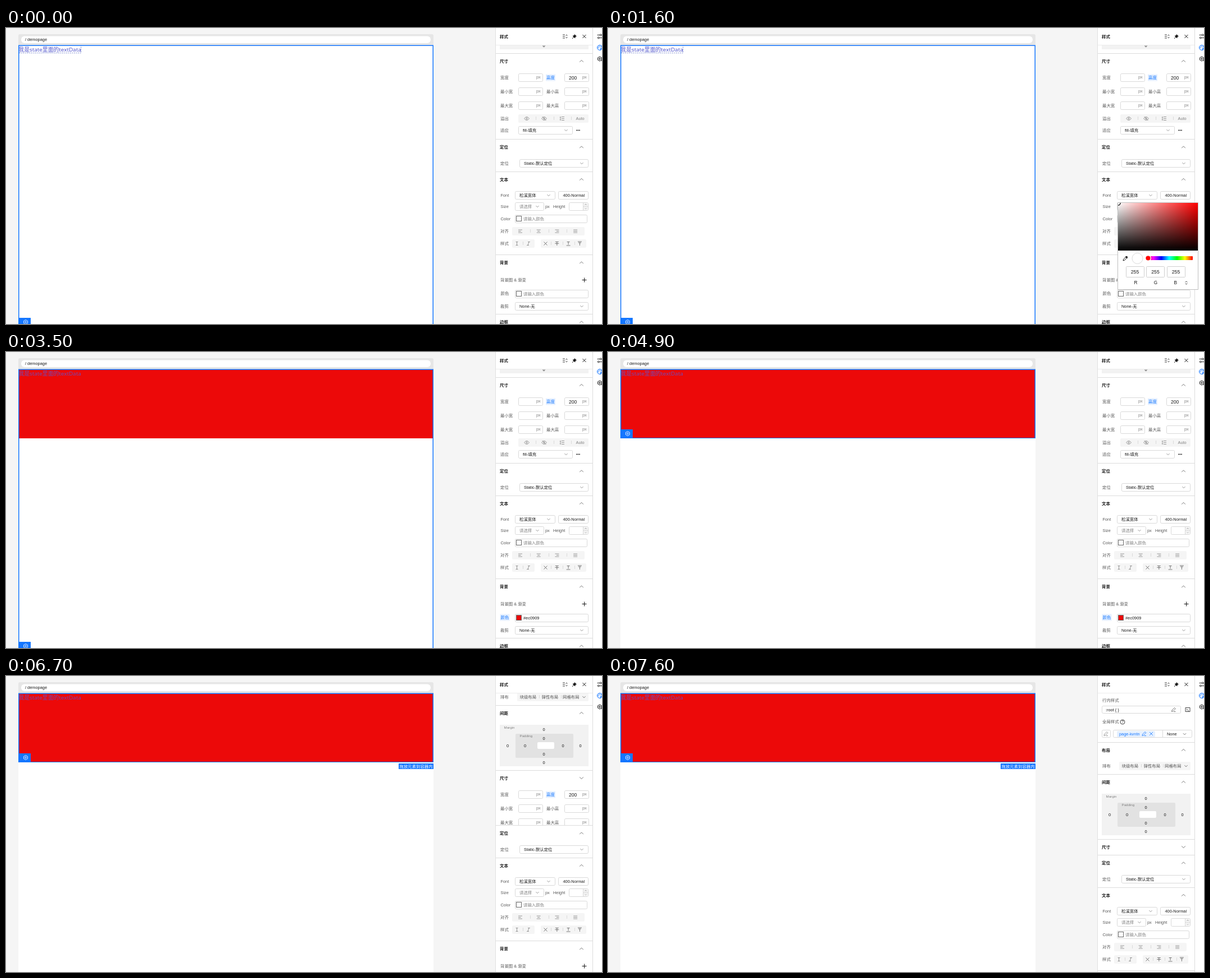
Write an HTML page with a canvas that moves like this. It is 1061x528 px and loops after 8 s.

```html
<!DOCTYPE html>
<html lang="zh-CN">
<head>
<meta charset="utf-8">
<title>样式</title>
<style>
html, body { margin: 0; width: 100%; height: 100%; overflow: hidden; background: #f5f5f5; }
canvas { display: block; width: 100vw; height: 100vh; }
</style>
</head>
<body>
<canvas id="stage" width="1061" height="528"></canvas>
<script>
const ctx = document.getElementById('stage').getContext('2d');
const LOOP = 8000;
const UI = '"Liberation Sans", "Noto Sans CJK SC", "Noto Sans CJK", sans-serif';
const PAGE = '"Noto Sans", "Noto Sans CJK SC", "Noto Sans CJK", sans-serif';
const BLUE = '#1476ff', RED = '#ec0909', INK = '#191919', GREY = '#595959', SOFT = '#808080';
const EDGE = '#d9d9d9', FILL = '#f5f5f5', TINT = '#e5f0ff';

// Drawing helpers
function rect(x, y, w, h, color) {
  ctx.fillStyle = color;
  ctx.fillRect(x, y, w, h);
}
function round(x, y, w, h, r, color) {
  ctx.fillStyle = color;
  ctx.beginPath();
  ctx.roundRect(x, y, w, h, r);
  ctx.fill();
}
function box(x, y, w, h, edge = EDGE, r = 2) {
  ctx.beginPath();
  ctx.roundRect(x + .5, y + .5, w - 1, h - 1, r);
  ctx.fillStyle = '#fff';
  ctx.fill();
  ctx.strokeStyle = edge;
  ctx.lineWidth = 1;
  ctx.stroke();
}
function text(s, x, y, color = GREY, size = 7.4, opt = {}) {
  ctx.font = `${opt.weight || 400} ${size}px ${opt.font || UI}`;
  ctx.textAlign = opt.align || 'left';
  ctx.fillStyle = color;
  ctx.fillText(s, x, y + size * .36);
}
function icon(x, y, d, color = GREY, width = .8) {
  ctx.save();
  ctx.translate(x, y);
  ctx.strokeStyle = color;
  ctx.lineWidth = width;
  ctx.stroke(new Path2D(d));
  ctx.restore();
}
function disc(x, y, r, fill, edge, width = 1) {
  ctx.beginPath();
  ctx.arc(x, y, r, 0, Math.PI * 2);
  if (fill) { ctx.fillStyle = fill; ctx.fill(); }
  if (edge) { ctx.strokeStyle = edge; ctx.lineWidth = width; ctx.stroke(); }
}
function clipped(x, y, w, h, draw) {
  ctx.save();
  ctx.beginPath();
  ctx.rect(x, y, w, h);
  ctx.clip();
  draw();
  ctx.restore();
}
function shifted(dy, draw) {
  ctx.save();
  ctx.translate(0, dy);
  draw();
  ctx.restore();
}

const SHAPE = {
  up: 'M-3.3 1.7L0 -1.7L3.3 1.7',
  down: 'M-2.6 -1.3L0 1.4L2.6 -1.3',
  cross: 'M-3 -3L3 3M3 -3L-3 3',
  plus: 'M-4 0H4M0 -4V4',
  pencil: 'M-3.5 3.5L-3 1L1.5 -3.5L3.3 -1.7L-1 2.7ZM0 3.5H3.5',
  eye: 'M-4.5 0Q0 -6 4.5 0Q0 6 -4.5 0ZM-1.3 0A1.3 1.3 0 1 0 1.3 0A1.3 1.3 0 1 0 -1.3 0',
  list: 'M-1 -3H4M-1 0H4M-1 3H4M-3 -3V3M-4 -2L-3 -3L-2 -2M-4 2L-3 3L-2 2',
  gear: 'M0 -4L3.5 -2V2L0 4L-3.5 2V-2ZM-1.4 0A1.4 1.4 0 1 0 1.4 0A1.4 1.4 0 1 0 -1.4 0',
  left: 'M-3.5 -2.5H3.5M-3.5 0H1M-3.5 2.5H3.5',
  center: 'M-3.5 -2.5H3.5M-2 0H2M-3.5 2.5H3.5',
  right: 'M-3.5 -2.5H3.5M-1 0H3.5M-3.5 2.5H3.5',
  justify: 'M-3.5 -2.5H3.5M-3.5 0H3.5M-3.5 2.5H3.5',
  upright: 'M-2 -3H2M-2 3H2M0 -3V3',
  italic: 'M-1 -3H3M-3 3H1M1 -3L-1 3',
  strike: 'M-3 -3H3M-3.5 0H3.5M0 -3V3.5',
  under: 'M-2.5 -3H2.5M0 -3V2M-3.5 3.5H3.5',
  over: 'M-3.5 -3.5H3.5M-2.5 -1.5H2.5M0 -1.5V3.5'
};

// Panel building blocks
function section(name, line, y, open = true) {
  rect(872, line, 172, 1, '#dcdcdc');
  text(name, 879, y, INK, 7.4, { weight: 700 });
  icon(1024.5, y, open ? SHAPE.up : 'M-3.3 -1.7L0 1.7L3.3 -1.7', GREY);
}
function select(x, y, w, value, color = INK, arrow = SOFT, pad = 8) {
  box(x, y - 7, w, 15);
  text(value, x + pad, y, color);
  icon(x + w - 12, y + .3, SHAPE.down, arrow);
}
function pxField(x, y, value, color = SOFT) {
  box(x, y - 7, 44, 15);
  if (value) text(value, x + 8, y + .5, INK, 8.6);
  text('px', x + 32, y - .5, color);
}
function group(x, y, w, seps) {
  round(x, y - 7, w, 15, 2, FILL);
  for (const s of seps) rect(s, y - 3, 1, 6, '#dadada');
}
function active(name, x, y) {
  rect(x - 1, y - 6, 17, 12, TINT);
  text(name, x, y, BLUE);
}
function colorField(y, w, swatch, value) {
  box(906, y - 7, w, 15);
  rect(908, y - 5, 10, 10, '#666');
  rect(909, y - 4, 8, 8, swatch);
  text(value || '请输入颜色', 921, y, value ? INK : SOFT);
}

function upperSections() {
  text('行内样式', 880, 43);
  box(879, 53, 141, 14);
  text(':root { }', 886, 60, INK);
  icon(1007, 60, SHAPE.pencil);
  icon(1032, 60, 'M-4 -3.5H4V3.5H-4ZM-2 -1.5L-.5 0L-2 1.5M0 2H2', INK);
  text('全局样式', 880, 81.5);
  disc(916, 82, 4, null, INK, .8);
  text('?', 916, 82, INK, 6.5, { align: 'center' });

  box(879, 96, 16, 14);
  icon(886.5, 103, SHAPE.pencil, SOFT);
  box(899, 96, 141, 14);
  rect(987, 96, 1, 14, EDGE);
  round(906, 98, 68, 11, 2, TINT);
  text('page-kvntn', 910, 103, BLUE);
  icon(954.5, 103, SHAPE.pencil, BLUE);
  icon(967, 103, SHAPE.cross, BLUE);
  text('None', 995, 103, INK);
  icon(1026.5, 103.5, SHAPE.down);

  section('布局', 118, 132);
  text('排布', 880, 160);
  group(910, 160, 127, [949, 988]);
  ['块级布局', '弹性布局', '网格布局'].forEach((s, i) => text(s, [914.5, 953.5, 991][i], 160, GREY));
  icon(1029, 160.5, SHAPE.down);

  section('间距', 175, 189);
  rect(879, 210, 158, 74, '#f2f2f2');
  round(907, 226, 103, 43, 2, '#e2e2e2');
  round(946, 241, 30, 12, 2, '#fff');
  text('Margin', 886.5, 215, SOFT, 6.2);
  text('Padding', 914.5, 230, SOFT, 6.2);
  for (const y of [218.5, 234, 262, 277]) text('0', 957.5, y, INK, 7.4, { align: 'center' });
  for (const x of [893, 924, 991.5, 1022.5]) text('0', x, 247.5, INK, 7.4, { align: 'center' });
}

function sizeSection(open, extra, hoverPx) {
  section('尺寸', 291, 305, open);
  clipped(872, 292, 172, 27 + extra, () => shifted(246, () => {
    text('宽度', 880, 88.5);
    pxField(912, 88, '', hoverPx ? BLUE : SOFT);
    active('高度', 962, 88.5);
    pxField(994, 88, '200');
    [['最小宽', '最小高', 113], ['最大宽', '最大高', 138]].forEach(([a, b, y]) => {
      text(a, 880, y);
      pxField(912, y, '');
      text(b, 962, y);
      pxField(994, y, '');
    });
    text('溢出', 880, 161.5);
    group(912, 161, 125, [943, 975, 1006]);
    icon(927, 161.5, SHAPE.eye, SOFT);
    icon(958, 161.5, SHAPE.eye + 'M-3.5 -3.5L3.5 3.5', SOFT);
    icon(990, 161.5, SHAPE.list, SOFT);
    text('Auto', 1014.5, 161.5, SOFT);
    text('适应', 880, 182.5);
    select(912, 182, 97, 'fill-填充');
    for (const x of [1016, 1018.5, 1021]) disc(x, 182.5, .9, INK);
  }));
}

function lowerSections(t) {
  const picked = t >= 2700, applied = t >= 3500;
  section('定位', 198, 212.5);
  text('定位', 880, 241);
  select(914, 241, 123, 'Static-默认定位', INK, t >= 700 && t < 800 ? INK : SOFT);

  section('文本', 256, 270);
  text('Font', 880.5, 298);
  select(906, 298, 72, '松溪宽体');
  box(983, 291, 54, 15);
  text('400-Normal', 991.5, 298, INK);
  text('Size', 880.5, 318);
  select(906, 318, 52, '请选择', SOFT);
  text('px', 960, 318);
  text('Height', 974, 318);
  box(1002, 311, 35, 15);
  rect(1028, 312, 8, 13, FILL);
  rect(1027, 311, 1, 14, EDGE);
  rect(1028, 318, 8, 1, EDGE);
  icon(1032, 315, 'M-1.7 .9L0 -.9L1.7 .9', SOFT, .7);
  icon(1032, 322, 'M-1.7 -.9L0 .9L1.7 -.9', '#aaa', .7);
  text('Color', 880.5, 340);
  colorField(340, 129, '#fff');
  text('对齐', 880, 362.5);
  group(901, 362, 129, [933, 966, 998]);
  ['left', 'center', 'right', 'justify'].forEach((k, i) => icon(915.5 + i * 32.7, 362.5, SHAPE[k], SOFT));
  text('样式', 880, 384.5);
  group(901, 384, 40, [920]);
  icon(909.5, 384.5, SHAPE.upright, SOFT);
  icon(930, 384.5, SHAPE.italic, SOFT);
  group(952, 384, 81, [970, 991, 1012]);
  ['cross', 'strike', 'under', 'over'].forEach((k, i) => icon(960.5 + i * 20.3, 384.5, SHAPE[k], GREY));

  section('背景', 404, 418.5);
  text('背景图 & 渐变', 880, 449);
  icon(1029.5, 449.5, SHAPE.plus, INK, 1);
  if (applied) active('颜色', 880.5, 473.5);
  else text('颜色', 880.5, 473.5);
  colorField(474, 131, picked ? RED : '#fff', applied ? '#ec0909' : '');
  text('裁剪', 880, 496);
  select(906, 496, 131, 'None-无');
  section('边框', 510, 524.5);
}

function sidePanel(t) {
  const step = t < 6600 ? 0 : Math.min(4, Math.floor((t - 6600) / 100) + 1);
  const scroll = [246, 185, 123, 61, 0][step];
  const extra = [125, 115, 70, 20, 0][step];

  rect(871, 0, 190, 528, '#fff');
  clipped(872, 31, 172, 497, () => {
    shifted(-scroll, () => {
      upperSections();
      sizeSection(step === 0, extra, t >= 5500 && t < 6200);
    });
    shifted(121 - scroll + extra, () => lowerSections(t));
  });
  rect(871, 0, 1, 528, '#e0e0e0');
  rect(1044, 0, 1, 528, '#dcdcdc');
  rect(872, 30, 172, 1, '#ececec');

  text('样式', 879, 15, INK, 7.4, { weight: 700 });
  icon(995, 15, 'M-4 -3H0M-4 0H0M-4 3H0M1.5 -1.3L3 -3L4.5 -1.3M1.5 1.3L3 3L4.5 1.3', INK);
  ctx.fillStyle = INK;
  ctx.beginPath();
  [[1012, 11], [1016, 15], [1014, 15.5], [1013, 18.5], [1008.5, 14], [1011.5, 13]].forEach(p => ctx.lineTo(...p));
  ctx.fill();
  icon(1010, 17, 'M-2 2L1 -1', INK, 1);
  icon(1029.5, 15, SHAPE.cross, INK, 1);

  icon(1057, 15, 'M-4.5 -2.5H5M-4.5 2.5H5', INK, .9);
  disc(1058.5, 12.5, 1.4, '#fff', INK, .9);
  disc(1055, 17.5, 1.4, '#fff', INK, .9);
  disc(1057, 35, 4.5, TINT, BLUE, 1);
  for (const [x, y] of [[1054.5, 35], [1056, 32.7], [1059, 33]]) disc(x, y, .8, BLUE);
  icon(1058.5, 37, 'M3 -1H0V3', BLUE, 1);
  icon(1057, 55, SHAPE.gear, INK, 1);
  icon(1059, 57, 'M0 0L3 3', INK, 1);
}

function page(t) {
  const applied = t >= 3500, inner = t >= 4900;
  round(22, 11, 739, 24, [3, 3, 0, 0], '#e6e6e6');
  round(27, 14.5, 729, 12.5, 6, '#fff');
  text('/ demopage', 34, 20.5, INK);
  rect(22, 31, 739, 497, '#fff');
  if (applied) rect(22, 31, 739, 123, RED);

  text('我是state里面的textData', 22.3, 38, applied ? '#7348b4' : '#5256cc', 9.84, { font: PAGE });
  if (!applied) {
    ctx.setLineDash([2, 1.5]);
    icon(0, 0, 'M23 44.5H133.5V32', '#5f6fc4');
    ctx.setLineDash([]);
  }

  const bottom = inner ? 154 : 528;
  rect(22, 30.5, 739, 1.5, BLUE);
  rect(22, 31, 1.5, bottom - 31, BLUE);
  rect(759.5, 31, 1.5, bottom - 31, BLUE);
  if (t >= 4500) rect(22, 153, 739, 1, BLUE);
  const tab = inner ? 138 : 517;
  rect(22, tab, 22, 16, BLUE);
  icon(35, tab + 7.5, SHAPE.gear, '#fff');

  // The hint drops out briefly while the selection moves.
  if (t >= 4500 && !(inner && t < 5100)) {
    rect(699, 156, 62, 10, BLUE);
    text('拖放元素到容器内', 700.5, 161, '#fff');
  }
}

function gradient(x0, y0, x1, y1, colors) {
  const g = ctx.createLinearGradient(x0, y0, x1, y1);
  colors.forEach((c, i) => g.addColorStop(i / (colors.length - 1), c));
  return g;
}

function picker(picked) {
  box(907, 311, 144, 156, '#bdbdbd', 0);
  rect(908, 312, 142, 85, gradient(908, 0, 1050, 0, ['#fff', '#f00']));
  rect(908, 312, 142, 85, gradient(0, 312, 0, 397, ['rgba(0,0,0,0)', '#000']));
  const [x, y] = picked ? [1043, 318] : [908, 312];
  clipped(908, 312, 142, 85, () => {
    disc(x, y, 4, null, '#000', 1.6);
    disc(x, y, 2.8, null, '#fff', 1.3);
  });

  icon(921, 411, 'M-4 4L-3.3 1.5L1 -2.7L2.7 -1L-1.5 3.3Z', INK, 1);
  icon(921, 411, 'M.5 -3.5L3.5 -.5M1.5 -1.5L3.5 -3.5', INK, 2);
  disc(942.5, 411, 9.5, picked ? RED : '#fff', picked ? RED : '#d0d0d0', .8);
  round(957, 407, 84, 7, 1, gradient(957, 0, 1041, 0, ['#f00', '#f0f', '#00f', '#0ff', '#0f0', '#ff0', '#f00']));
  disc(961.5, 410.5, 4.8, '#f00', '#fff', 1.4);

  const values = picked ? [236, 9, 9] : [255, 255, 255];
  values.forEach((v, i) => {
    const left = 922 + i * 36.5;
    box(Math.floor(left), 425, 33, 20, '#cfcfcf', 1);
    text(String(v), left + 16, 434.5, INK, 8.7, { align: 'center' });
    text('RGB'[i], 939.5 + i * 35.4, 454.5, INK, 8.2, { align: 'center' });
  });
  icon(1029.5, 454.5, 'M-1.7 -1L0 -2.7L1.7 -1M-1.7 1L0 2.7L1.7 1', INK, .9);
}

function draw(now) {
  const t = now % LOOP;
  rect(0, 0, 1061, 528, '#f5f5f5');
  page(t);
  sidePanel(t);
  if (t >= 1600 && t < 3500) picker(t >= 2700);
  requestAnimationFrame(() => draw(performance.now() - start));
}
const start = performance.now();
draw(0);
</script>
</body>
</html>
```
